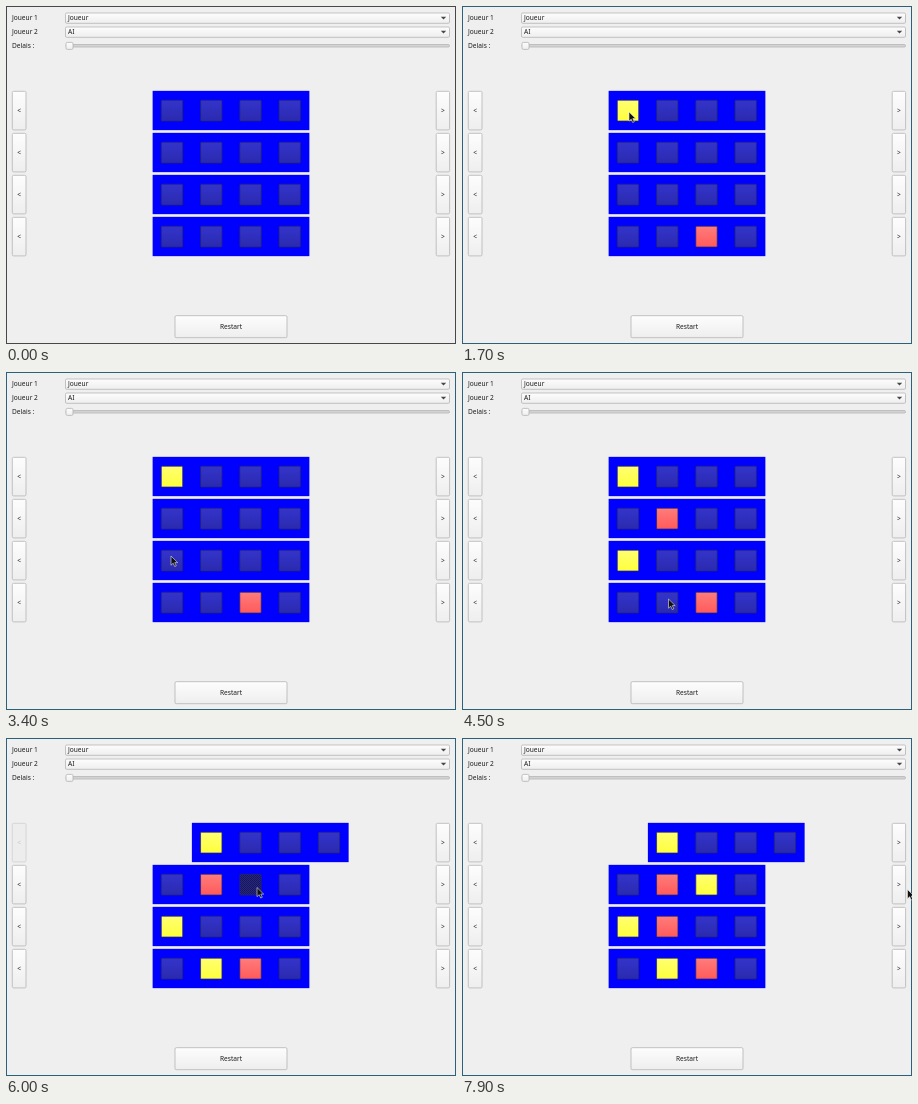
An HTML page that plays this animation: 450x338 px, repeating every 8000 ms.

```html
<!DOCTYPE html>
<html lang="fr">
<head>
<meta charset="utf-8">
<style>
html, body { margin: 0; width: 100%; height: 100%; overflow: hidden; background: #efefef; }
svg { display: block; width: 100%; height: 100%; }
text { font: 6.6px "Noto Sans", "Open Sans", sans-serif; fill: #1c1c1c; }
.mid { text-anchor: middle; }
.box { fill: url(#button); stroke: #b4b4b4; stroke-width: .8; }
.off .box { fill: #ededed; stroke: #d0d0d0; }
.off text { fill: #c4c4c4; }
.cell { stroke: #24246e; stroke-width: .7; }
</style>
</head>
<body>
<svg id="stage" viewBox="0 0 450 338">
  <defs>
    <linearGradient id="button" x2="0" y2="1"><stop stop-color="#fdfdfd"/><stop offset="1" stop-color="#eeeeee"/></linearGradient>
    <linearGradient id="empty" x2="0" y2="1"><stop stop-color="#3434cc"/><stop offset="1" stop-color="#2a2aae"/></linearGradient>
    <linearGradient id="yellow" x2="0" y2="1"><stop stop-color="#ffff70"/><stop offset="1" stop-color="#ffff3c"/></linearGradient>
    <linearGradient id="red" x2="0" y2="1"><stop stop-color="#ff7c7c"/><stop offset="1" stop-color="#ff5a5a"/></linearGradient>
    <pattern id="pressed" width="2" height="2" patternUnits="userSpaceOnUse">
      <rect width="2" height="2" fill="#25258c"/><path d="M0 0h1v1h1v1h-1v-1h-1z" fill="#18184c"/>
    </pattern>
  </defs>
  <rect width="450" height="338" fill="#efefef"/>
  <g id="ui"></g>
  <g id="board"></g>
  <rect id="frame" x=".5" y=".5" width="449" height="337" fill="none"/>
  <path id="cursor" d="M0 0V9.2L2.2 7.2 3.7 10.5 5.3 9.8 3.8 6.6H6.7Z" fill="#111" stroke="#e8e8e8" stroke-width=".6"/>
</svg>
<script>
const LOOP = 8000, ROW = 42, STEP = 39.25;
const $ = id => document.getElementById(id);

function add(parent, tag, attrs, content = "") {
  const el = document.createElementNS("http://www.w3.org/2000/svg", tag);
  for (const key in attrs) el.setAttribute(key, attrs[key]);
  el.textContent = content;
  return parent.appendChild(el);
}

const ui = $("ui");
const label = (x, y, s, parent = ui) => add(parent, "text", { x, y }, s);

function button(x, y, width, height, s) {
  const g = add(ui, "g", {});
  add(g, "rect", { x, y, width, height, rx: 1.3, class: "box" });
  label(x + width / 2, y + height / 2 + 2.4, s, g).setAttribute("class", "mid");
  return g;
}

["Joueur", "AI"].forEach((value, i) => {
  const y = 7 + i * 14;
  label(6, y + 7.4, `Joueur ${i + 1}`);
  add(ui, "rect", { x: 59.5, y, width: 384, height: 10.3, rx: 1.3, class: "box" });
  label(62, y + 7.4, value);
  add(ui, "path", { d: `M434.8 ${y + 3.7}h5.4l-2.7 2.8z`, fill: "#484848" });
});
label(6, 42.4, "Delais :");
add(ui, "rect", { x: 60, y: 38.5, width: 383.5, height: 2.6, rx: 1.2, fill: "#d2d2d2", stroke: "#aaa", "stroke-width": .6 });
add(ui, "rect", { x: 60, y: 36.4, width: 7, height: 7, rx: 1.3, class: "box" });
button(169, 309.7, 112, 22, "Restart");

// Each row has two shift buttons and a strip of four cells
const back = [], rows = [], cells = [];
for (let r = 0; r < 4; r++) {
  const y = 85 + r * ROW;
  back.push(button(6.3, y + .3, 13.7, 38.6, "<"));
  button(430.2, y + .3, 13.4, 38.6, ">");
  const g = add($("board"), "g", {});
  rows.push(g);
  add(g, "rect", { x: 146, y: y - 1, width: 158, height: 41, fill: "#f8f8f4" });
  add(g, "rect", { x: 146.6, y: y - .2, width: 156.8, height: 39.4, fill: "#00f" });
  cells.push([0, 1, 2, 3].map(c => add(g, "rect", {
    x: 155.3 + c * STEP, y: y + 9.2, width: 21.4, height: 20.8, rx: .8, class: "cell"
  })));
}

// time, row, column, fill
const moves = [
  [1400, 0, 0, "yellow"], [1500, 3, 2, "red"],
  [3700, 2, 0, "yellow"], [3800, 1, 1, "red"],
  [4700, 3, 1, "yellow"],
  [6000, 1, 2, "pressed"], [6100, 1, 2, "yellow"], [6200, 2, 1, "red"]
];
const SHIFT = 4800, UNLOCK = 6100;

// time, x, y of the pointer tip
const path = [
  [500, 300, 170], [900, 183.5, 109.5], [1200, 167, 106], [1900, 167, 106],
  [2500, 169, 149], [3100, 165, 184], [3900, 165, 184],
  [4500, 206.5, 227], [5000, 206.5, 227], [5800, 251, 149.5],
  [6500, 251, 149.5], [7200, 383, 151], [7700, 445.5, 151.5], [8000, 445.5, 151.5]
];

function pointerAt(t) {
  const i = path.findIndex(p => p[0] > t);
  const [t0, x0, y0] = path[i - 1], [t1, x1, y1] = path[i];
  const k = (t - t0) / (t1 - t0), e = k * k * (3 - 2 * k);
  return [x0 + (x1 - x0) * e, y0 + (y1 - y0) * e];
}

function draw(t) {
  cells.flat().forEach(cell => cell.setAttribute("fill", "url(#empty)"));
  for (const [at, r, c, fill] of moves)
    if (t >= at) cells[r][c].setAttribute("fill", `url(#${fill})`);
  rows[0].setAttribute("transform", `translate(${t >= SHIFT ? STEP : 0} 0)`);
  back[0].setAttribute("class", t >= SHIFT && t < UNLOCK ? "off" : "");
  const inside = t >= path[0][0];
  $("frame").setAttribute("stroke", inside ? "#2d6079" : "#484848");
  $("cursor").setAttribute("visibility", inside ? "visible" : "hidden");
  if (inside) $("cursor").setAttribute("transform", `translate(${pointerAt(t)})`);
}

function tick() {
  // The picture advances in steps of 100 ms
  draw(Math.floor(performance.now() % LOOP / 100) * 100);
  requestAnimationFrame(tick);
}
tick();
</script>
</body>
</html>
```
